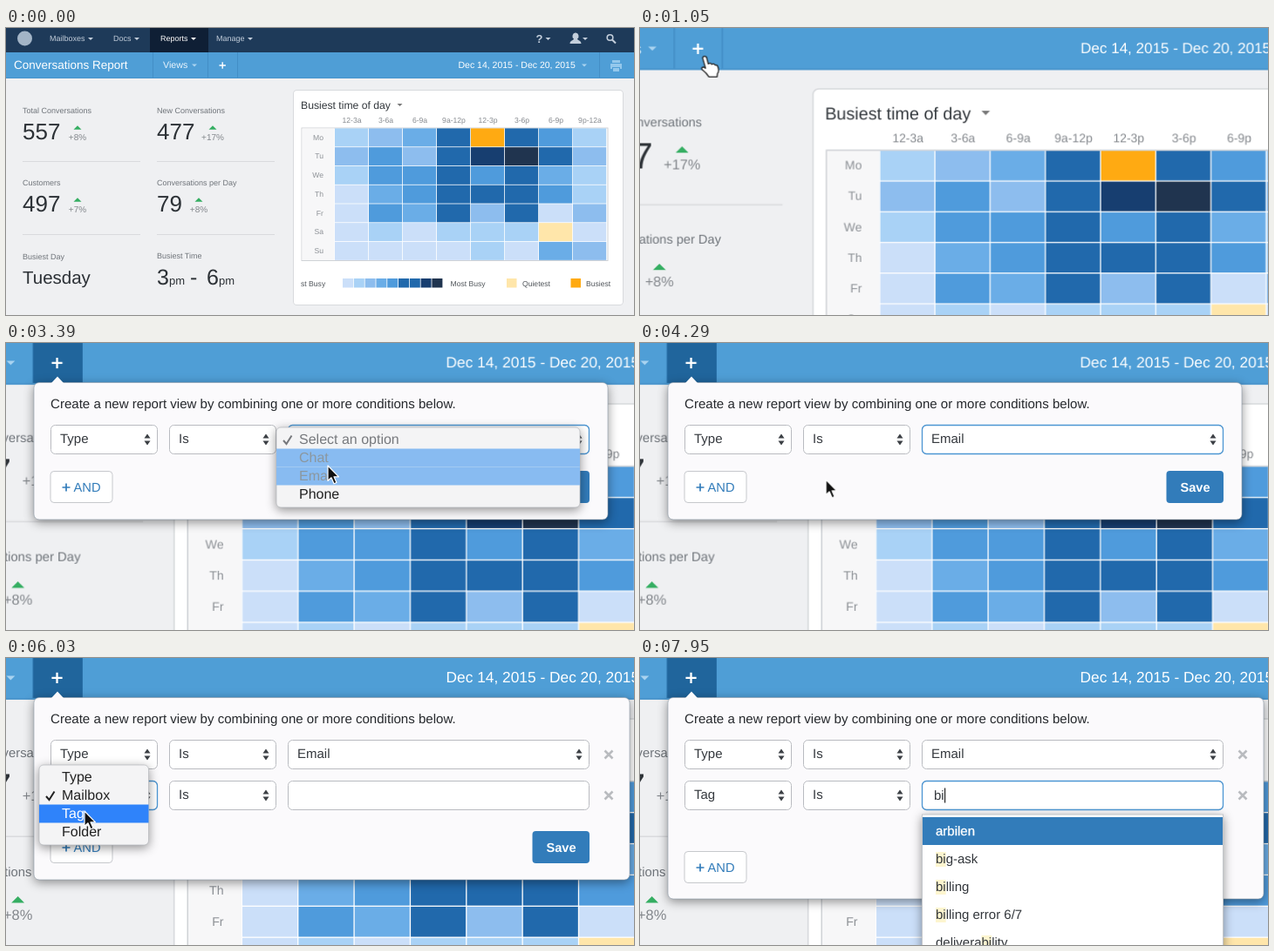
An HTML page that plays this animation: 720x330 px, repeating every 8000 ms.

```html
<!DOCTYPE html>
<html lang="en">
<head>
<meta charset="utf-8">
<title>Report view builder</title>
<style>
html, body { margin: 0; width: 100%; height: 100%; overflow: hidden; background: #eff0f2; }
svg { display: block; width: 720px; height: 330px; }
text { font-family: "Liberation Sans", Arial, sans-serif; white-space: pre; text-rendering: geometricPrecision; }
.shadow { filter: drop-shadow(0 3px 6px rgba(0, 0, 0, .42)); }
</style>
</head>
<body>
<svg id="stage" viewBox="0 0 720 330"></svg>
<script>
const LOOP = 8000;
const stage = document.getElementById('stage');

// Drawing helpers
function make(parent, tag, attrs = {}) {
  const el = document.createElementNS('http://www.w3.org/2000/svg', tag);
  for (const k in attrs) el.setAttribute(k, attrs[k]);
  parent.appendChild(el);
  return el;
}
const group = (p, attrs) => make(p, 'g', attrs);
const rect = (p, x, y, width, height, fill, more) => make(p, 'rect', { x, y, width, height, fill, ...more });
const path = (p, d, fill, more) => make(p, 'path', { d, fill, ...more });
function text(p, x, y, str, size, fill, more) {
  const el = make(p, 'text', { x, y, 'font-size': size, fill, ...more });
  el.textContent = str;
  return el;
}
const line = (p, d, stroke, width = 1) => path(p, d, 'none', { stroke, 'stroke-width': width });
const down = (p, x, y, fill, r = 3) => path(p, `M${x - r} ${y - r / 2}h${2 * r}l${-r} ${r}z`, fill);

// Timing helpers: steps are [ms, properties, easing]
function play(el, steps) {
  const frames = steps.map(([ms, props, easing = 'linear']) => ({ ...props, easing, offset: ms / LOOP }));
  if (frames[0].offset > 0) frames.unshift({ ...steps[0][1], offset: 0 });
  if (frames[frames.length - 1].offset < 1) frames.push({ ...steps[steps.length - 1][1], offset: 1 });
  el.animate(frames, { duration: LOOP, iterations: Infinity });
}
function show(el, from, to = LOOP, fade = 0) {
  const off = { opacity: 0 }, on = { opacity: 1 };
  const steps = [[from + fade, on], [to, on]];
  if (from > 0) steps.unshift([0, off], [from, off]);
  if (to < LOOP) steps.push([to, off], [LOOP, off]);
  play(el, steps);
  return el;
}

// Report page
const page = group(stage);
rect(page, 0, 0, 720, 330, '#eff0f2');

rect(page, 0, 0, 720, 28, '#1e3a59');
rect(page, 165, 0, 67, 28, '#0f1f35');
make(page, 'circle', { cx: 21.5, cy: 12, r: 8.5, fill: '#a3b5c7' });
const navItems = [['Mailboxes', 50, 97], ['Docs', 123, 150], ['Reports', 177, 215], ['Manage', 241, 280]];
for (const [label, x, caret] of navItems) {
  const color = label === 'Reports' ? '#fff' : '#c3cedb';
  text(page, x, 15.5, label, 9, color);
  down(page, caret, 12.5, color);
}
text(page, 607.5, 17, '?', 13, '#c3cedb', { 'font-weight': 'bold' });
down(page, 621.5, 12.5, '#c3cedb');
path(page, 'M653 5.5a3.4 3.8 0 0 1 2 7c0 1.6 4.5 1.8 4.5 5.5h-13c0-3.7 4.5-3.9 4.5-5.5a3.4 3.8 0 0 1 2-7z', '#c3cedb');
down(page, 664, 12.5, '#c3cedb');
make(page, 'circle', { cx: 692.5, cy: 11, r: 3.3, fill: 'none', stroke: '#c3cedb', 'stroke-width': 1.6 });
line(page, 'M695 13.5l4 4', '#c3cedb', 2);

rect(page, 0, 28, 720, 30, '#4f9ed6');
rect(page, 0, 57, 720, 1, '#4793cb');
line(page, 'M168.5 28v29M231.5 28v29M265.5 28v29M680.5 28v29', '#438ec6');
const plusTab = rect(page, 231.5, 28, 34.5, 29, '#20659c');
text(page, 9, 47.3, 'Conversations Report', 13.5, '#fff');
text(page, 180, 46.5, 'Views', 10.7, '#eaf5fd');
down(page, 216, 43, '#a9d3f0');
line(page, 'M244.5 43h7.4M248.2 39.3v7.4', '#fff', 1.4);
text(page, 518.5, 46.3, 'Dec 14, 2015 - Dec 20, 2015', 10.5, '#fff');
down(page, 663, 43, '#a9d3f0');
path(page, 'M695 37h9v3h-9zM693 41h13v6h-2v-2h-9v2h-2zM696 46h7v4h-7z', '#94c8ec');

// Key figures
line(page, 'M19 153.5h135M173 153.5h135M19 237.5h135M173 237.5h135', '#d9dadd');
const figures = [
  [19, 98, 'Total Conversations', '557', '+8%', 63],
  [173, 98, 'New Conversations', '477', '+17%', 64],
  [19, 181, 'Customers', '497', '+7%', 63],
  [173, 181, 'Conversations per Day', '79', '+8%', 48]
];
for (const [x, y, label, value, change, dx] of figures) {
  text(page, x, y, label, 9, '#6f747a');
  text(page, x, y + 30, value, 26, '#2c3136');
  path(page, `M${x + dx - 4.5} ${y + 18.7}h9l-4.5 -4.5z`, '#35ae62');
  text(page, x + dx, y + 30.5, change, 10, '#83878c', { 'text-anchor': 'middle' });
}
text(page, 19, 266, 'Busiest Day', 9, '#6f747a');
text(page, 19, 294, 'Tuesday', 20.5, '#2c3136');
text(page, 173, 264.5, 'Busiest Time', 9, '#6f747a');
[[173, '3', 25], [187, 'pm', 13], [211, '-', 25], [230, '6', 25], [244, 'pm', 13]]
  .forEach(([x, s, size]) => text(page, x, 295, s, size, '#2c3136'));

// Heat map
rect(page, 329.5, 71.5, 378, 247, '#fff', { rx: 4, stroke: '#d8dadd' });
text(page, 338, 93, 'Busiest time of day', 12.2, '#33383d');
down(page, 451.5, 88.5, '#777');
const tones = {
  1: '#cbdff9', 2: '#a9d2f6', 3: '#8dbdee', 4: '#6aade7', 5: '#4f9bdc',
  6: '#2169ac', 7: '#173e70', 8: '#20344f', B: '#ffaa12', Q: '#ffe6aa'
};
const hours = ['12-3a', '3-6a', '6-9a', '9a-12p', '12-3p', '3-6p', '6-9p', '9p-12a'];
const week = {
  Mo: '2346B652', Tu: '35367863', We: '25565642', Th: '14566652',
  Fr: '15463613', Sa: '121222Q1', Su: '11112143'
};
const COL = 39, ROW = 21.75;
rect(page, 339, 115, 351, 152.5, '#fff', { stroke: '#cfd2d6' });
rect(page, 339.5, 115.5, 37, 151.5, '#f7f7f8');
hours.forEach((h, c) => text(page, 377 + COL * (c + 0.5), 109, h, 8.6, '#85898e', { 'text-anchor': 'middle' }));
Object.entries(week).forEach(([day, cells], r) => {
  const y = 115 + ROW * r;
  text(page, 364, y + 13.6, day, 8.6, '#8d9196', { 'text-anchor': 'end' });
  [...cells].forEach((k, c) => rect(page, 377 + COL * c, y + 0.4, COL - 0.8, ROW - 0.8, tones[k]));
});
[...'123456678'].forEach((k, i) => rect(page, 386 + i * 12.8, 288, 12, 10.5, tones[k]));
rect(page, 574, 288, 11.5, 10.5, tones.Q);
rect(page, 647.5, 288, 11.5, 10.5, tones.B);
[[338, 'st Busy'], [509.5, 'Most Busy'], [592, 'Quietest'], [665, 'Busiest']]
  .forEach(([x, s]) => text(page, x, 296.5, s, 8.6, '#50555a'));

play(page, [
  [0, { transform: 'translate(0px, 0px) scale(1)' }, 'cubic-bezier(.37, 0, .63, 1)'],
  [1210, { transform: 'translate(-351px, -48px) scale(1.65)' }]
]);
show(plusTab, 1400, LOOP, 90);

// Condition panel
const OPEN = 1470, ADD = 5010, TAGS = 7110;
const INK = '#35393e', BLUE = '#327cba';
const panel = show(group(stage), OPEN, LOOP, 120);
const sheet = rect(panel, 32, 45.5, 658, 157.5, '#fbfafc', { rx: 6, class: 'shadow', stroke: '#8a97a5', 'stroke-width': 0.6 });
path(panel, 'M52 46l7-7.5l7 7.5z', '#fbfafc');
const size = (width, height) => ({ width: width + 'px', height: height + 'px' });
play(sheet, [
  [ADD, size(658, 157.5)], [ADD + 120, size(683, 209.5)],
  [TAGS, size(683, 209.5)], [TAGS + 30, size(683, 231.5)]
]);
text(panel, 51, 75, 'Create a new report view by combining one or more conditions below.', 15.07, '#26292d');

function field(p, x, y, w) {
  return rect(p, x + 0.5, y + 0.5, w - 1, 33, '#fff', { rx: 5, stroke: '#b9bbc0' });
}
function focus(p, x, y, w, from, to) {
  const ring = rect(p, x + 0.5, y + 0.5, w - 1, 33, 'none', { rx: 5, stroke: '#4c96d3', 'stroke-width': 1.3 });
  show(ring, from, to);
}
function select(p, x, y, w) {
  field(p, x, y, w);
  const cx = x + w - 12, cy = y + 17;
  path(p, `M${cx - 3.5} ${cy - 1.5}h7l-3.5 -5zM${cx - 3.5} ${cy + 1.5}h7l-3.5 5z`, '#3b3f44');
}
const value = (p, x, y, s) => text(p, x, y + 21.4, s, 15, INK);
const remove = (p, y) => line(p, `M686.5 ${y - 4.5}l9 9m0 -9l-9 9`, '#b9bbbf', 2.6);

const buttons = group(panel);
rect(buttons, 51, 147.5, 71, 36, '#fff', { rx: 4, stroke: '#c6c8cc' });
line(buttons, 'M64.5 166h9M69 161.5v9', BLUE, 1.7);
text(buttons, 77.5, 171.3, 'AND', 14.7, BLUE);
rect(buttons, 603.5, 147, 65.5, 37, BLUE, { rx: 4 });
text(buttons, 636.5, 170.5, 'Save', 14.6, '#fff', { 'font-weight': 'bold', 'text-anchor': 'middle' });
const drop = y => ({ transform: `translate(0px, ${y}px)` });
play(buttons, [[ADD, drop(0)], [ADD + 120, drop(52)], [TAGS, drop(52)], [TAGS + 30, drop(75)]]);

const PICKED = 3600, SWAPPED = 6360;
select(panel, 51, 94, 123);
select(panel, 187, 94, 123);
select(panel, 323, 94, 346);
value(panel, 62, 94, 'Type');
value(panel, 198, 94, 'Is');
show(value(panel, 334, 94, 'Select an option'), 0, PICKED);
show(value(panel, 334, 94, 'Email'), PICKED);
focus(panel, 51, 94, 123, 1950, 3030);
focus(panel, 323, 94, 346, 3030, ADD);

const second = show(group(panel), ADD, LOOP, 120);
select(second, 51, 141, 123);
select(second, 187, 141, 123);
field(second, 323, 141, 346);
show(value(second, 62, 141, 'Mailbox'), ADD, SWAPPED);
show(value(second, 62, 141, 'Tag'), SWAPPED);
value(second, 198, 141, 'Is');
remove(second, 111);
remove(second, 158);
focus(second, 51, 141, 123, ADD, TAGS);
focus(second, 323, 141, 346, TAGS);

// Native menus; lit rows are [index, from, to, colours]
const LIT = ['#2f83fa', '#fff'], FADING = ['#88bbf1', '#8b979f'];
function menu(x, y, w, items, checked, from, to, lit) {
  const g = show(group(stage), from, to);
  rect(g, x, y, w, 8 + 21 * items.length, '#f4f4f5', { rx: 5, class: 'shadow', stroke: '#b4b6ba', 'stroke-width': 0.7 });
  const row = (p, i, color) => {
    const cy = y + 14 + 21 * i;
    text(p, x + 26, cy + 4.9, items[i], 16, color);
    if (i === checked) line(p, `M${x + 8} ${cy + 1}l3.5 4l6 -9.5`, color, 2);
  };
  items.forEach((_, i) => row(g, i, i === checked && w > 200 ? '#77797d' : '#222'));
  for (const [i, a, b, [fill, color] = LIT] of lit) {
    const hot = show(group(g), a, b);
    rect(hot, x, y + 3.5 + 21 * i, w, 21, fill);
    row(hot, i, color);
  }
}
const kinds = ['Type', 'Mailbox', 'Tag', 'Folder'];
menu(38, 97, 125.5, kinds, 0, 1980, 2460, [[0, 1980, 2460]]);
menu(310, 97, 348, ['Select an option', 'Chat', 'Email', 'Phone'], 0, 3060, PICKED, [
  [0, 3060, 3240], [1, 3240, 3360], [1, 3360, 3420, FADING], [2, 3360, 3420, FADING], [2, 3420, PICKED]
]);
menu(38, 123, 125.5, kinds, 1, 5670, SWAPPED, [[1, 5670, 5880], [2, 5880, SWAPPED]]);

// Tag suggestions
const B = 7770, BI = 7890;
const list = show(group(stage), TAGS);
rect(list, 323.5, 180, 345, 170, '#fff', { class: 'shadow', stroke: '#c3c6ca' });
rect(list, 324, 183, 344, 32, BLUE);
text(list, 339, 204, 'arbilen', 15, '#fff', { stroke: '#fff', 'stroke-width': 0.3 });
function suggest(tags, from, to, marks = []) {
  const g = show(group(list), from, to);
  tags.forEach((tag, i) => {
    const y = 236 + 32 * i;
    if (marks.length) rect(g, 339 + marks[i], y - 13, 11.7, 17, '#fdf5cf');
    text(g, 339, y, tag, 15, '#33373c');
  });
}
suggest(['beta feedback form', 'big-ask', 'billing', 'bug report'], TAGS, BI);
suggest(['big-ask', 'billing', 'billing error 6/7', 'deliverability'], BI, LOOP, [0, 0, 0, 52.5]);

const typed = (s, from, to) => show(text(stage, 337, 163, s, 15, INK), from, to);
typed('b', B, BI);
typed('bi', BI);
const caret = (x, from, to) => show(rect(stage, x, 149.5, 1.2, 17, '#222'), from, to);
caret(337, TAGS, 7500);
caret(345.7, B, BI);
caret(349, BI);

// Pointer
const pointer = group(stage);
const edge = { 'stroke-width': 1.2, 'stroke-linejoin': 'round' };
const hand = path(pointer, 'M-2 1.5q0-2 2-2t2.3 2l1.5 6q2.5-1.8 3.6 .5q2.3-1.3 3.4 .7q2.7-.5 3.2 2.3q1.5 4-.5 6.5l-.5 3.5h-8.5q-2.5-4-7-7.5q-1.5-2.5 1.5-2.8l2 1.3z', '#fff', { ...edge, stroke: '#222', transform: 'scale(1.1)' });
const arrow = path(pointer, 'M0 0v17.5l4-3.7l3 7l3-1.3l-3-6.7h5.5z', '#111', { ...edge, stroke: '#fff' });
const beam = group(pointer);
const beamPath = 'M-4-9.5q4 0 4 2.5q0-2.5 4-2.5M0-7v14M-4 9.5q4 0 4-2.5q0 2.5 4 2.5M-2 1h4';
line(beam, beamPath, '#fff', 3);
line(beam, beamPath, '#222', 1.3);
show(hand, 0, 1590);
show(arrow, 1590, 6690);
show(beam, 6690, B);

const route = [
  [0, 380, 355], [1050, 74, 33], [1260, 62, 24], [1530, 62, 24], [1890, 122, 112],
  [2190, 133, 112], [2490, 133, 112], [2970, 369, 112], [3150, 369, 113], [3390, 369, 141],
  [3540, 370, 150], [3750, 370, 150], [4770, 86, 163], [5700, 86, 163], [6000, 90, 176],
  [6390, 90, 176], [6800, 388, 158]
];
play(pointer, route.map(([ms, x, y]) => [ms, { transform: `translate(${x}px, ${y}px)` }, 'ease-in-out']));
</script>
</body>
</html>
```
